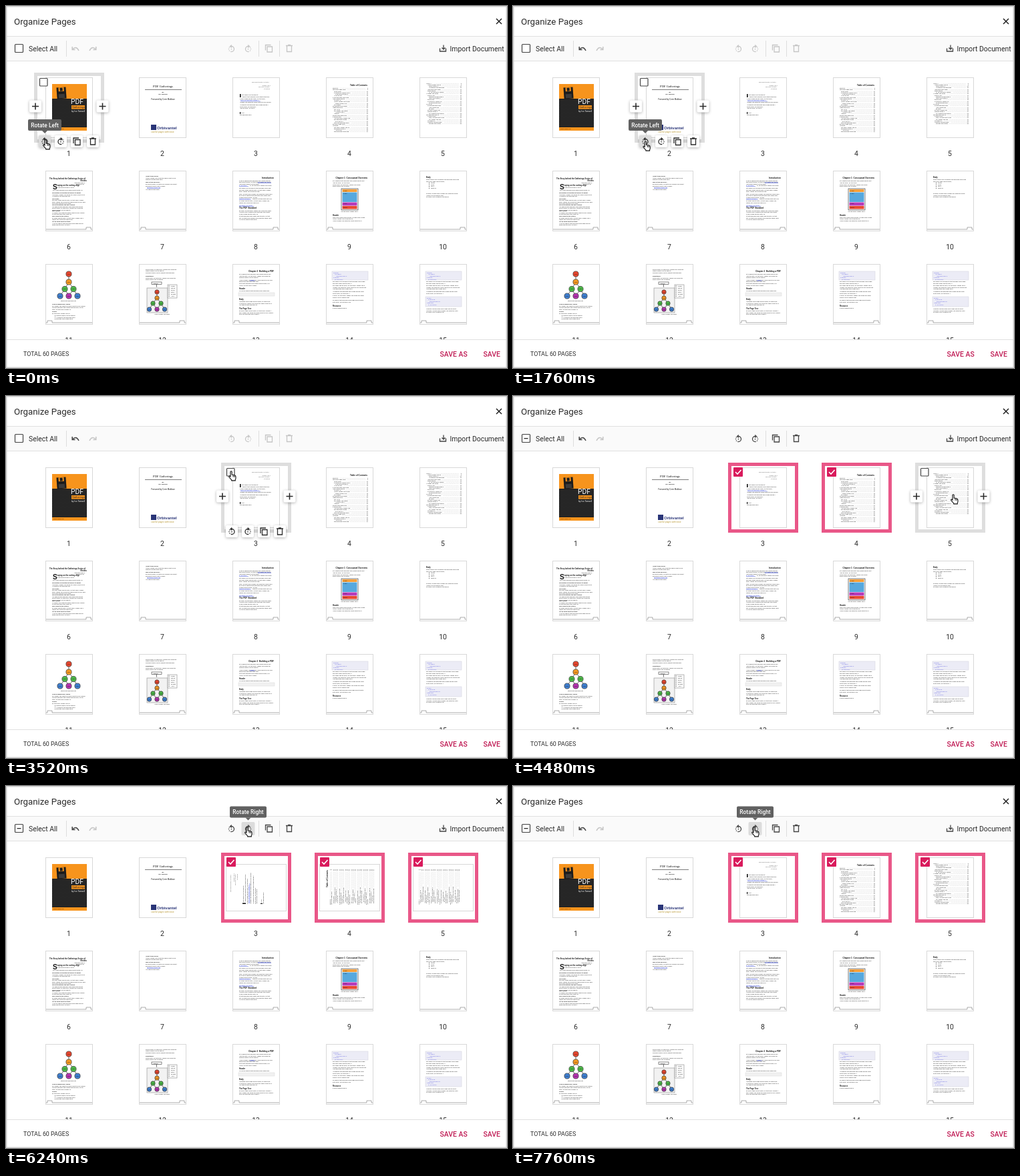
Recreate the animation shown at these times as an HTML page with a canvas. Size 750 px wide and 543 px high, loop 7920 ms.

```html
<!DOCTYPE html>
<html lang="en">
<head>
<meta charset="utf-8">
<title>Organize Pages</title>
<style>
html, body { margin: 0; width: 100%; height: 100%; overflow: hidden; background: #fff; }
canvas { display: block; }
</style>
</head>
<body>
<canvas id="stage" width="750" height="543"></canvas>
<script>
const ctx = document.getElementById('stage').getContext('2d');
const LOOP = 7920, STEP = 80, PAGE_W = 71, PAGE_H = 91, PITCH = 140;
const DARK = '#2b2b2b', PINK = '#d91a5c';
const FILLER = 'the document holds a set of objects that describe each page and its fonts, so that every reader can show the same result on any device without changes to layout or colour. ';

// ---- Page thumbnails ----
let g; // context of the thumbnail being drawn

function box(x, y, w, h, fill, stroke) {
  if (fill) { g.fillStyle = fill; g.fillRect(x, y, w, h); }
  if (stroke) { g.strokeStyle = stroke; g.lineWidth = .6; g.strokeRect(x, y, w, h); }
}

// Tiny text is laid out at 20px and scaled so its spacing stays exact.
function tiny(s, x, y, size, { bold = false, align = 'left', color = '#111', font = '"Liberation Sans", sans-serif' } = {}) {
  g.save();
  g.translate(x, y);
  g.scale(size / 20, size / 20);
  g.font = `${bold ? 'bold ' : ''}20px ${font}`;
  g.textAlign = align;
  g.fillStyle = color;
  g.fillText(s, 0, 0);
  g.restore();
}

function para(x, y, w, n = 1, color = '#111', gap = 2.6) {
  for (let i = 0; i < n; i++) {
    const start = Math.round(y * 7 + i * 37) % 90;
    const width = n > 1 && i === n - 1 ? w * .6 : w;
    tiny(FILLER.slice(start, start + width / 1.02), x, y + i * gap, 2.2, { color });
  }
}
const heading = (s, y, size = 2.7) => tiny(s, 10, y, size, { bold: true });
const title = (s, y = 12) => tiny(s, 62, y, 3.1, { bold: true, align: 'right' });
const link = (x, y, w) => { para(x, y, w, 1, '#1a2fd0'); box(x, y + .3, w, .4, '#1a2fd0'); };

function contents(from, to, indents) {
  for (let y = from, i = 0; y < to; y += 2.25, i++) {
    const x = 10 + indents[i % indents.length], w = 10 + (i * 11) % 17;
    para(x, y, w);
    tiny('.'.repeat(Math.floor((59 - x - w) / .62)), x + w + 1, y, 2.2);
    tiny(String(8 + i), 63, y, 2.2, { align: 'right' });
  }
}

function tree(spots, r) {
  const colors = ['#e8472f', '#f59a23', '#4cb848', '#4cb848', '#3f7fd0', '#b534b0', '#3f7fd0'];
  g.strokeStyle = '#333';
  g.lineWidth = .7;
  [[0, 1], [1, 2], [1, 3], [2, 4], [2, 5], [3, 5], [3, 6]].forEach(([a, b]) => {
    g.beginPath();
    g.moveTo(...spots[a]);
    g.lineTo(...spots[b]);
    g.stroke();
  });
  spots.forEach(([x, y], i) => {
    g.beginPath();
    g.arc(x, y, r, 0, 7);
    g.fillStyle = colors[i];
    g.fill();
    g.stroke();
    tiny('node', x, y + .6, r / 2, { align: 'center' });
  });
}

function codeBox(y, h) {
  box(9, y, 54, h, '#ececf6', '#d6d6e2');
  for (let i = 0; i < h / 2.5 - 1; i++) para(11 + (i % 3) * 2, y + 2.6 + i * 2.5, 7 + (i * 5) % 12, 1, '#5a5ae0');
}

function cover() {
  box(10, 10, 52, 70, '#232323');
  for (let y = 34; y < 73; y += 2) for (let x = 11 + (y / 2 % 2); x < 61; x += 2) box(x, y, 1, 1, '#303030');
  box(10, 10, 52, 22, '#f7941d');
  box(10, 75, 52, 5, '#f7941d');
  para(12, 78.3, 16);
  g.save();
  g.translate(24, 23);
  g.rotate(-.07);
  box(-7, -8, 14, 17, '#1c1c1c');
  box(-4, -8, 8, 6, '#f7941d');
  box(-2, -7.5, 4, 5, '#1c1c1c');
  box(-4.5, 2, 9, 6, '#3a3a3a');
  g.restore();
  tiny('PDF', 38, 40, 10.3, { color: '#fff', font: 'Roboto, sans-serif' });
  box(39, 42, 20, 5.6, '#f7941d');
  tiny('Gatherings', 40, 46.3, 3.9, { color: '#222' });
  tiny('by Ivo Tamsell', 39, 52, 3.2, { color: '#fff' });
}

function titlePage() {
  const serif = '"Liberation Serif", serif', align = 'center';
  tiny('PDF Gatherings', 36, 15, 4.6, { align, font: serif });
  box(9, 18, 55, .7, '#444');
  tiny('By', 36, 22.5, 2.4, { align, bold: true });
  tiny('Ivo Tamsell', 36, 26.3, 2.5, { align, bold: true });
  tiny('Foreword by Corin Maldave', 36, 34.3, 2.9, { align });
  box(18, 71, 8, 8, '#2a3578');
  tiny('Orbivantel', 27, 78.3, 6, { bold: true, color: '#2a3578' });
  tiny('careful pages with ease', 18, 83, 3.3, { color: '#b8962e' });
}

function copyright() {
  [[8, 29], [12.5, 14], [15, 19], [17.5, 11]].forEach(([y, w]) => para(58 - w, y, w, 1, '#555'));
  box(11, 25, 1.6, 5, '#111');
  para(14, 27, 27);
  para(14, 29.6, 44);
  para(11, 32.5, 42);
  link(12, 35.4, 30);
  para(11, 38.3, 47);
  para(11, 42, 46, 2);
  para(11, 47, 26);
  box(11, 52, 1.2, 3, '#111');
  para(13, 54, 6);
  para(11, 56.7, 18);
}

function story() {
  tiny('The Story behind the Gatherings Series of', 60, 12.6, 2.7, { bold: true, align: 'right' });
  title('Books', 15.7);
  para(43, 18.5, 17);
  para(46, 21, 14);
  tiny('S', 11, 28, 10, { bold: true });
  heading('          taying on the cutting edge', 23);
  para(18, 26, 26);
  para(11, 30, 49);
  [34, 42.5, 52, 61, 69, 77].forEach((y, i) => {
    heading(['Information is plentiful but harder to digest', 'The series', 'The best authors, the best content', 'Free forever', 'Free? What is the catch?', 'Let us know what you think'][i], y, 2.1);
    para(10, y + 2.7, 50, i === 1 || i === 2 ? 3 : 2);
  });
}

function closing() {
  heading('About these words', 8.5, 2.1);
  para(10, 11.5, 46, 2);
  heading('Who is this book for?', 18, 2.1);
  para(10, 21, 50, 2);
  link(12, 26.3, 20);
  para(10, 29, 24);
}

function introduction() {
  title('Introduction');
  para(10, 15.5, 51, 3);
  link(38, 18.1, 20);
  link(10, 23, 14);
  para(26, 23, 34);
  para(10, 27, 50, 3);
  para(10, 35.5, 50, 3);
  link(10, 42.5, 18);
  para(30, 42.5, 30);
  para(10, 46, 49, 2);
  link(10, 52.7, 22);
  heading('The PDF Standard', 57, 3);
  para(10, 60.5, 50, 3);
  para(10, 69, 50, 3);
}

function overview() {
  title('Chapter 1  Conceptual Overview');
  para(10, 16, 51, 2);
  para(10, 21.5, 45, 2);
  box(23, 27, 25, 32, '#fff', '#222');
  [[28, 4, '#f7a13c'], [32.5, 14.5, '#56a8de'], [47.5, 5, '#b838b8'], [53, 4.5, '#ea4b32']]
    .forEach(([y, h, color]) => { box(24.5, y, 22, h, color); para(26, y + 2.6, 7); });
  para(22, 62, 28);
  heading('Header', 67.5);
  para(10, 70.5, 51, 2);
  para(10, 76, 44);
}

function bullets() {
  heading('Body', 11);
  para(10, 14, 51, 2);
  for (let y = 19; y < 29; y += 2.6) { box(14, y - 1, .9, .9, '#111'); para(17, y, 5 + y % 4); }
  para(10, 35, 50, 2);
  para(10, 40, 38);
}

function treePage() {
  tree([[35, 15], [35, 27], [29, 37.5], [42, 37.5], [22, 48], [35, 48], [48, 48]], 4.1);
  para(23, 55.5, 25);
  heading('Cross-Reference Table', 60.5, 2.5);
  para(10, 63.5, 50, 3);
  heading('Trailer', 72, 2.3);
  para(10, 75, 28);
  for (let y = 78; y < 84; y += 2.5) { box(14, y - 1, .8, .8, '#111'); para(16, y, 24 + y % 9); }
}

function diagramPage() {
  para(10, 8.5, 50, 2);
  para(10, 13.5, 46);
  heading('Definitions', 18.5, 2.3);
  para(10, 21.5, 48, 2);
  box(19, 27, 15, 3.6, '#fff', '#333');
  para(21, 29.6, 10);
  box(26, 30.6, .7, 4, '#333');
  box(12, 36, 31, 37, '#f2f2f2', '#888');
  box(43, 31, 14, 20, '#fafafa', '#888');
  for (let y = 34; y < 51; y += 3) { box(44.5, y - 1.5, 1.2, 1.2, '#666'); para(48, y, 7); }
  tree([[27, 42], [27, 51], [21, 59], [33, 59], [15.5, 68], [27, 68], [38.5, 68]], 3.2);
  para(23, 76, 24);
}

function buildingPage() {
  title('Chapter 2  Building a PDF');
  para(10, 16, 51, 3);
  para(10, 24.5, 50, 2);
  link(26, 24.5, 8);
  para(10, 30, 50, 2);
  heading('Header', 38);
  para(10, 41, 47);
  box(9, 43, 54, 5, '#f1f1f1', '#ddd');
  heading('Body', 54);
  para(10, 57, 50, 3);
  heading('The Page Tree', 68);
  para(10, 71, 51, 3);
}

function codePage(second) {
  codeBox(11, 13);
  para(10, 27, 51, 2);
  para(10, 33, 51, 3);
  para(10, 42, 50, 2);
  if (second) { codeBox(49, 15); para(10, 68, 50, 3); return; }
  para(10, 48, 49, 2);
  para(10, 55, 51, 2);
  heading('Resource', 64);
  para(10, 67, 24);
}

const painters = [cover, titlePage, copyright,
  () => { title('Table of Contents', 13.3); contents(17, 83, [0, 0, 2, 2, 4, 2]); },
  () => contents(9.5, 72, [0, 2, 4, 4, 2, 2, 4]),
  story, closing, introduction, overview, bullets, treePage, diagramPage, buildingPage,
  () => codePage(false), () => codePage(true)];

const pages = painters.map((paint, i) => {
  const canvas = document.createElement('canvas');
  canvas.width = PAGE_W;
  canvas.height = PAGE_H;
  g = canvas.getContext('2d');
  box(0, 0, PAGE_W, PAGE_H, '#fff');
  paint();
  if (i > 4) {
    const x = i % 2 ? 61 : 3;
    g.strokeStyle = '#777';
    g.lineWidth = .6;
    g.stroke(new Path2D(`M1 88 H${x} V85 H${x + 7} V88 H70`));
  }
  g.strokeStyle = '#d8d8d8';
  g.lineWidth = 1;
  g.strokeRect(.5, .5, PAGE_W - 1, PAGE_H - 1);
  return canvas;
});

// ---- Interface ----
function label(s, x, y, size, { color = DARK, weight = 400, align = 'left' } = {}) {
  ctx.font = `${weight} ${size}px Roboto, sans-serif`;
  ctx.textAlign = align;
  ctx.fillStyle = color;
  ctx.fillText(s, x, y);
}
function rect(x, y, w, h, color) {
  ctx.fillStyle = color;
  ctx.fillRect(x, y, w, h);
}
function rounded(x, y, w, h, r, color) {
  ctx.beginPath();
  ctx.roundRect(x, y, w, h, r);
  ctx.fillStyle = color;
  ctx.fill();
}

const ICONS = {
  close: 'M-4-4 L4 4 M4-4 L-4 4',
  plus: 'M-5 0 H5 M0-5 V5',
  copy: 'M-2.5-2.5 H5 V5.5 H-2.5 Z M-5 3 V-5 H3',
  trash: 'M-5-4 H5 M-2-5 H2 M-3.5-4 V5 H3.5 V-4',
  undo: 'M-4.8-3 V1.5 H-.5 M-4.3 1 Q1-5 5 3',
  import: 'M-4.5 0 V4.5 H4.5 V0 M1-5 V1 M-1.5-1 L1 1.5 L3.5-1',
  turn: 'M0-3.5 A4 4 0 0 1 0 4.5',
  dots: 'M0 4.5 A4 4 0 0 1 -4 .5 A4 4 0 0 1 -2.5 -2.7',
  tip: 'M.3-6.2 L-2.9-3.5 L.3-.8 Z',
};
for (const key in ICONS) ICONS[key] = new Path2D(ICONS[key]);
const HAND = new Path2D('M-1 1q0-1.2 1.1-1.2t1.1 1.2v4l4 .9q1.8.4 1.8 2v2q0 1.5-.7 2.6v1.4h-5.6v-1l-3.6-4q-.8-1 0-1.6t1.9.6z');

function icon(name, x, y, color = DARK, flip = 1, width = 1.3) {
  ctx.save();
  ctx.translate(x, y);
  ctx.scale(flip, 1);
  ctx.strokeStyle = ctx.fillStyle = color;
  ctx.lineWidth = width;
  if (name === 'rotate') {
    ctx.stroke(ICONS.turn);
    ctx.fill(ICONS.tip);
    ctx.fillRect(-.7, 0, 1.4, 1.4);
    ctx.setLineDash([1.3, 1.4]);
    ctx.stroke(ICONS.dots);
  } else ctx.stroke(ICONS[name]);
  ctx.restore();
}

function button(x, y, hot) {
  ctx.save();
  ctx.shadowColor = 'rgba(0,0,0,.3)';
  ctx.shadowBlur = 4;
  ctx.shadowOffsetY = 1;
  rounded(x - 9, y - 9, 18, 18, 2, hot ? '#dcdcdc' : '#fff');
  ctx.restore();
}

function checkbox(x, y, size) {
  ctx.strokeStyle = '#444';
  ctx.lineWidth = 1.2;
  ctx.beginPath();
  ctx.roundRect(x, y, size, size, 1);
  ctx.fillStyle = '#fff';
  ctx.fill();
  ctx.stroke();
}

function tooltip(text, x, bottom) {
  const w = text.endsWith('Left') ? 50 : 55;
  rounded(x - w / 2, bottom - 17, w, 17, 2, '#616161');
  ctx.beginPath();
  ctx.moveTo(x - 4, bottom);
  ctx.lineTo(x, bottom + 4);
  ctx.lineTo(x + 4, bottom);
  ctx.fill();
  label(text, x, bottom - 5.5, 8.4, { color: '#fff', weight: 500, align: 'center' });
}

// ---- Timeline ----
const CURSOR = [
  [0, 59, 201], [400, 59, 201], [640, 83, 201], [1040, 83, 200], [1120, 104, 197], [1280, 150, 190],
  [1600, 198, 203], [2080, 199, 204], [2240, 222, 205], [2400, 223, 205], [2480, 245, 205], [2960, 290, 170],
  [3440, 337, 113], [3840, 337, 113], [4160, 476, 113], [4240, 476, 113], [4480, 659, 148], [4640, 617, 114],
  [4720, 617, 114], [5280, 338, 62], [5600, 338, 62], [5680, 361, 62], [6480, 361, 62], [6880, 352, 64],
  [7280, 361, 62], [LOOP, 361, 62],
];
const TOOLTIPS = [
  [0, 480, 'Rotate Left', 58, 187], [720, 1200, 'Rotate Right', 82, 187],
  [1760, 2080, 'Rotate Left', 198, 187], [2240, 2560, 'Rotate Right', 222, 187],
  [5360, 5760, 'Rotate Left', 337.5, 47.5], [5920, 6560, 'Rotate Right', 362.5, 47.5],
  [7600, LOOP, 'Rotate Right', 362.5, 47.5],
];
const ROTATED = [[160, 960], [1920, 2320], [5520, 7440], [5520, 7440], [5520, 7440]];
const SELECTED_AT = [Infinity, Infinity, 3600, 4160, 4640];
const UNDO_AT = 160;
const within = (t, [from, to]) => t >= from && t < to;

function cursorAt(t) {
  const i = CURSOR.findIndex(k => k[0] > t);
  const [t0, x0, y0] = CURSOR[i - 1], [t1, x1, y1] = CURSOR[i];
  const u = (t - t0) / (t1 - t0), e = u * u * (3 - 2 * u);
  return [x0 + (x1 - x0) * e, y0 + (y1 - y0) * e];
}

function drawPage(i, t, pointer, anySelected) {
  const left = 59 + i % 5 * PITCH, top = 107 + Math.floor(i / 5) * PITCH;
  const cx = left + 35.5, cy = top + 45.5;
  const selected = t >= SELECTED_AT[i];
  const hover = i < 5 && Math.abs(pointer[0] - cx) < 53 && pointer[1] > top - 7 && pointer[1] < top + 106;
  label(i + 1, cx - .5, top + 118, 10.4, { align: 'center' });
  ctx.save();
  ctx.translate(cx, cy);
  if (ROTATED[i] && within(t, ROTATED[i])) ctx.rotate(-Math.PI / 2);
  ctx.drawImage(pages[i], -PAGE_W / 2, -PAGE_H / 2);
  ctx.restore();
  if (hover || selected) {
    ctx.strokeStyle = selected ? '#e95788' : '#dedede';
    ctx.lineWidth = 5;
    ctx.strokeRect(left - 14.5, top - 4.5, 100, 100);
    if (selected) {
      rounded(left - 9, top, 14, 14, 1, PINK);
      ctx.strokeStyle = '#fff';
      ctx.lineWidth = 1.6;
      ctx.stroke(new Path2D(`M${left - 6} ${top + 7} l3 3 l5.5-6`));
    } else checkbox(left - 8.5, top + 1.5, 11.5);
  }
  if (!hover) return;
  [-15, 85.5].forEach(dx => {
    button(left + dx, top + 43.5);
    icon('plus', left + dx, top + 43.5, DARK, 1, 1.6);
  });
  if (anySelected) return;
  ['rotate', 'rotate', 'copy', 'trash'].forEach((name, k) => {
    const x = left - 1 + k * 24, y = top + 96;
    button(x, y, k < 2 && Math.abs(pointer[0] - x) < 9 && Math.abs(pointer[1] - y) < 10);
    icon(name, x, y, DARK, k === 1 ? -1 : 1);
  });
}

function drawChrome(t, pointer, anySelected) {
  rect(0, 46, 750, 36, '#fafafa');
  [45, 82].forEach(y => rect(0, y, 750, 1, '#e0e0e0'));
  label('Organize Pages', 12, 27.5, 13.3);
  icon('close', 738, 23, '#222', 1, 1.5);

  checkbox(13.5, 57.5, 12);
  if (anySelected) rect(16.5, 63, 6, 1.3, DARK);
  label('Select All', 34, 67.5, 10.4);
  [90, 378, 409].forEach(x => rect(x, 52, 1, 24, '#dedede'));
  const off = '#c6c6c6', tools = anySelected ? '#444' : off;
  icon('undo', 104, 64, t >= UNDO_AT ? '#444' : off, 1, 1.5);
  icon('undo', 130, 64, off, -1, 1.5);
  [337.5, 362.5].forEach((x, k) => {
    const hot = anySelected && Math.abs(pointer[0] - x) < 10 && Math.abs(pointer[1] - 64) < 10;
    if (hot) rounded(x - 10, 54, 20, 20, 2, '#dcdcdc');
    icon('rotate', x, 64, tools, k ? -1 : 1);
  });
  icon('copy', 393.5, 63.5, tools);
  icon('trash', 424, 63.5, tools);
  icon('import', 654, 63.5, '#444');
  label('Import Document', 664.5, 67.5, 10.4);

  rect(0, 500, 750, 43, '#fff');
  rect(0, 500, 750, 1, '#e0e0e0');
  label('TOTAL 60 PAGES', 26, 524.5, 8.9);
  label('SAVE AS', 649.5, 526, 10.4, { color: '#c01c55', weight: 500 });
  label('SAVE', 714.5, 526, 10.4, { color: '#c01c55', weight: 500 });
  ctx.strokeStyle = '#d2d2d2';
  ctx.lineWidth = 1.5;
  ctx.strokeRect(.75, .75, 748.5, 541.5);
}

function draw(now) {
  const t = Math.floor(now % LOOP / STEP) * STEP;
  const pointer = cursorAt(Math.max(0, t - STEP)); // hover lags one step behind the hand
  const anySelected = SELECTED_AT.some(at => t >= at);
  rect(0, 0, 750, 543, '#fff');
  pages.forEach((_, i) => drawPage(i, t, pointer, anySelected));
  drawChrome(t, pointer, anySelected);
  TOOLTIPS.filter(tip => within(t, tip)).forEach(([, , ...tip]) => tooltip(...tip));

  const [x, y] = cursorAt(t);
  ctx.save();
  ctx.translate(x, y);
  ctx.fillStyle = '#fff';
  ctx.strokeStyle = '#111';
  ctx.lineWidth = 1.1;
  ctx.fill(HAND);
  ctx.stroke(HAND);
  ctx.stroke(new Path2D('M3 6.5v2M5 7v1.7'));
  ctx.restore();
}

const begin = performance.now();
function tick() {
  draw(performance.now() - begin);
  requestAnimationFrame(tick);
}
tick();
</script>
</body>
</html>
```
